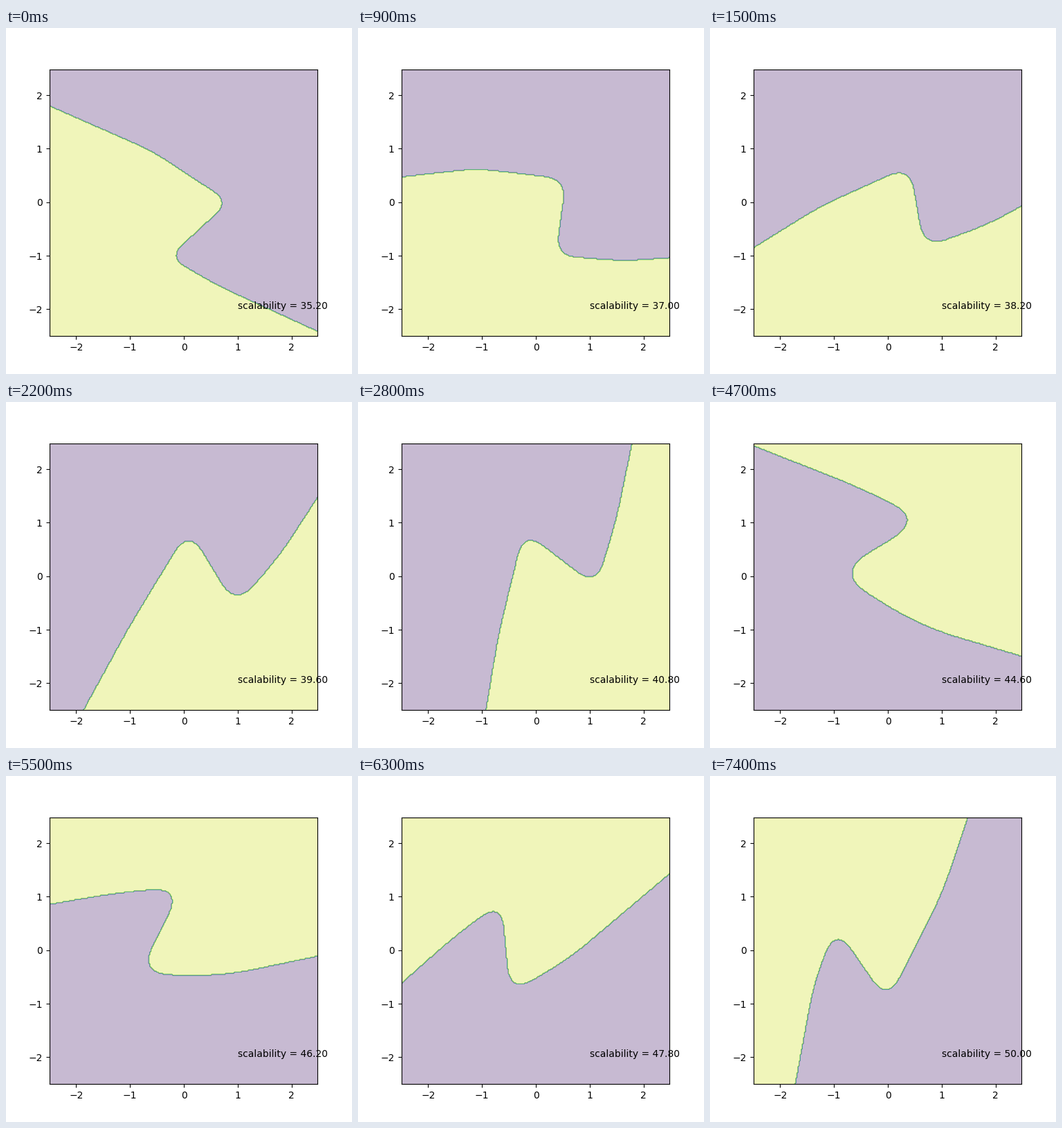
Animation, 500 px wide and 500 px high, one loop 8.4 s. Source, as a matplotlib script:

```python
import numpy as np
import matplotlib.pyplot as plt
from matplotlib.animation import FuncAnimation
from matplotlib.path import Path

START, STEP, LAST = 35.2, 0.2, 74
FRAMES, INTERVAL = 84, 100
TURN = 18  # degrees of rotation per unit of scalability

axis = np.arange(-2.5, 2.49, 0.02)
xx, yy = np.meshgrid(axis, axis)
grid = np.c_[xx.ravel(), yy.ravel()]
poses = []


def rotate(pts, deg):
    c, s = np.cos(np.radians(deg)), np.sin(np.radians(deg))
    return pts @ np.array([[c, s], [-s, c]])


def toward(p, q, dist, limit=0.5):
    """Point at a distance from p on the way to q, at most limit of the way."""
    d = q - p
    return p + d * min(dist / np.hypot(*d), limit)


def rounded(pts, radius):
    """Polyline with each corner replaced by a quadratic curve."""
    u = np.linspace(0, 1, 12)[:, None]
    out = [pts[:1]]
    for a, p, b in zip(pts, pts[1:], pts[2:]):
        a, b = toward(p, a, radius), toward(p, b, radius)
        out.append((1 - u)**2 * a + 2 * u * (1 - u) * p + u**2 * b)
    return np.vstack(out + [pts[-1:]])


def pose(value, radius, *corners):
    """S-shaped bend: end, tail bend, two tips, tail bend, end; kept upright."""
    pts = np.array(corners)
    ends = [toward(pts[i], pts[j], -4) for i, j in ((0, 1), (-1, -2))]
    pts[0], pts[-1] = ends
    poses.append((value, radius, rotate(pts, -TURN * value)))


pose(35.2, .35, (-2.5, 1.8), (-.6, .96), (.84, .01),
     (-.28, -1.03), (.65, -1.57), (2.47, -2.41))
pose(37.0, .40, (-2.5, .47), (-1.1, .63), (.56, .43),
     (.37, -1.0), (1.65, -1.1), (2.47, -1.04))
pose(39.6, .52, (-1.86, -2.5), (-.99, -.9), (.09, .88),
     (.955, -.56), (1.75, .34), (2.47, 1.45))
pose(42.2, .42, (-.04, -2.5), (-.33, -1.2), (-.54, .67),
     (1.13, .29), (.86, 1.64), (.66, 2.48))
pose(44.6, .75, (2.47, -1.49), (.6, -.93), (-.98, .06),
     (.66, 1.05), (-.45, 1.63), (-2.5, 2.44))
pose(47.8, .50, (2.47, 1.42), (.6, -.17), (-.48, -.8),
     (-.64, .91), (-1.5, .27), (-2.5, -.62))
pose(50.0, .52, (1.48, 2.47), (1.0, 1.04), (-.01, -.96),
     (-.96, .43), (-1.36, -.55), (-1.72, -2.5))


def boundary(value):
    times = [p[0] for p in poses]
    i = min(np.searchsorted(times, value + 1e-9), len(poses) - 1)
    (t0, r0, a), (t1, r1, b) = poses[i - 1], poses[i]
    f = (value - t0) / (t1 - t0)
    curve = rounded(a + f * (b - a), r0 + f * (r1 - r0))
    return rotate(np.vstack([curve, [12, -12]]), TURN * value)


fig, ax = plt.subplots(figsize=(5, 5), dpi=100)


def update(frame):
    value = START + STEP * min(frame, LAST)
    region = Path(boundary(value))
    z = region.contains_points(grid).reshape(xx.shape).astype(float)
    ax.clear()
    ax.contourf(xx, yy, z, alpha=0.3)
    ax.text(1, -2, f"scalability = {value:.2f}")
    return []


anim = FuncAnimation(fig, update, frames=FRAMES, init_func=lambda: [],
                     interval=INTERVAL, repeat=True, repeat_delay=0)
plt.show()
```
